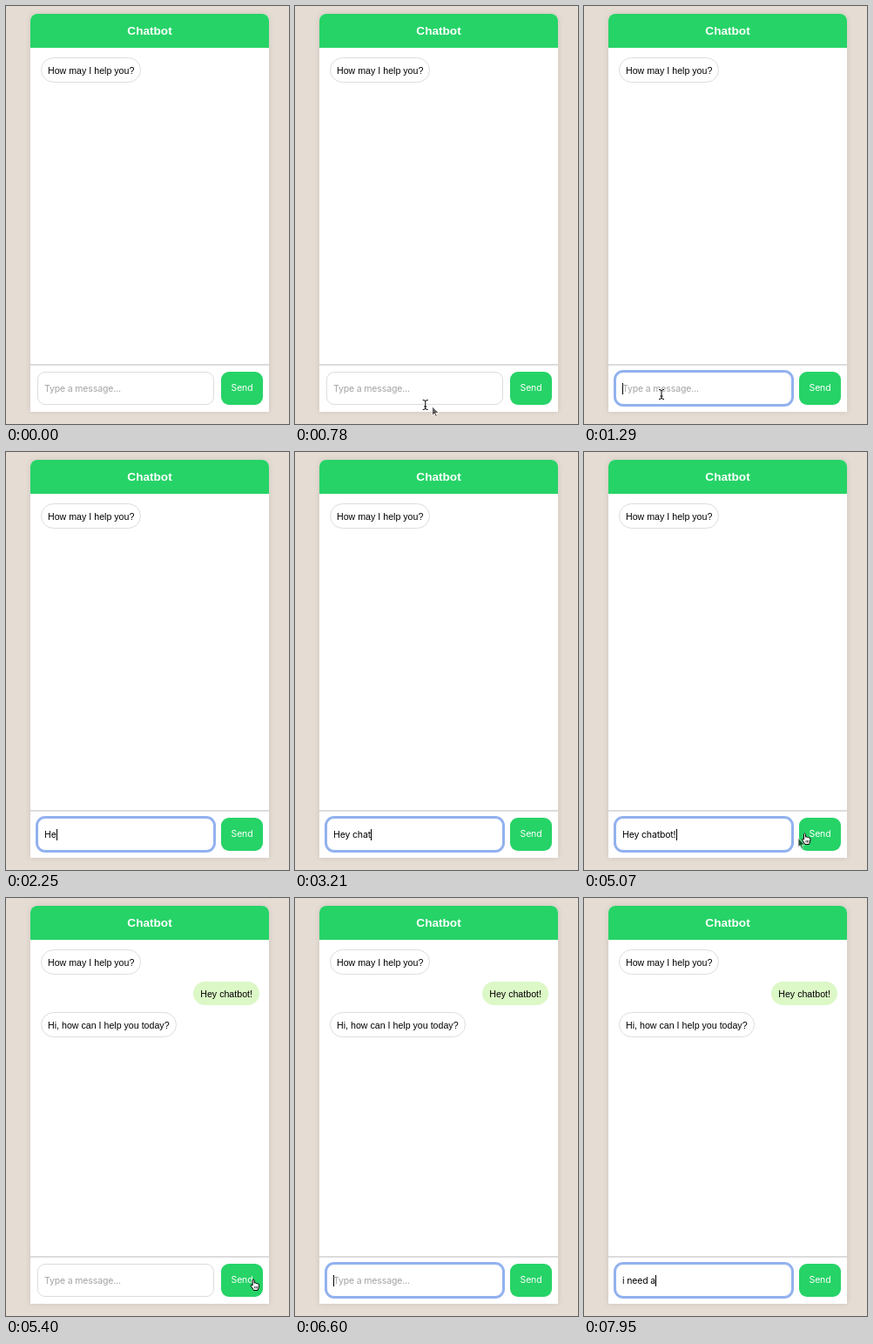
An HTML page for the animation above (8 s loop, 325 by 480 pixels).

```html
<!DOCTYPE html>
<html lang="en">
<head>
<meta charset="utf-8">
<title>Chatbot</title>
<style>
html, body { margin: 0; width: 100%; height: 100%; overflow: hidden; }
body { position: relative; background: #e5dcd3; font: 10.65px/14px "Liberation Sans", Arial, sans-serif; color: #000; }
body * { box-sizing: border-box; }
.card, .card > div, .cursor { position: absolute; }
.card { left: 28px; top: 9px; width: 274px; height: 457px; background: #fff; border-radius: 8px 8px 0 0; box-shadow: 0 0 7px rgba(0, 0, 0, .1); }
.card > .header { left: 0; top: 0; width: 274px; height: 39px; border-radius: 8px 8px 0 0; background: #26d367; color: #fff; font-weight: bold; font-size: 13.6px; line-height: 39px; text-align: center; }
.card > .bubble { height: 29px; padding: 7px 8px; border: 1px solid #ddd; border-radius: 15px; line-height: 14px; white-space: nowrap; left: 12px; padding: 7px; }
.card > .user { left: auto; right: 11px; top: 87px; height: 27px; padding: 7px 8px; border: 0; background: #dcf8c6; }
.card > .rule { left: 0; top: 402px; width: 274px; height: 2px; background: #dcdcdc; }
.card > .field, .card > .send { top: 411px; height: 38px; font: 10.5px/38px Inter, sans-serif; letter-spacing: -.15px; white-space: pre; }
.card > .field { left: 8px; width: 203px; padding-left: 7px; border: 1px solid #ddd; border-radius: 9px; background: #fff; }
.card > .field.focus { border-color: #91b1ef; box-shadow: 0 0 0 2px #91b1ef; }
.card > .send { left: 219px; width: 48px; border-radius: 9px; background: #26d367; color: #fff; text-align: center; }
.hint { color: #a3a3a3; }
.caret { display: inline-block; width: 1px; height: 13px; margin-right: -1px; background: #000; vertical-align: -3px; }
.cursor { left: 0; top: 0; width: 16px; height: 16px; overflow: visible; fill: #fff; stroke: #000; stroke-linejoin: round; }
[hidden] { display: none !important; }
</style>
</head>
<body>
<div class="card">
  <div class="header">Chatbot</div>
  <div class="bubble" style="top:50px">How may I help you?</div>
  <div class="bubble user reply">Hey chatbot!</div>
  <div class="bubble reply" style="top:122px">Hi, how can I help you today?</div>
  <div class="rule"></div>
  <div class="field"><span class="typed"></span><i class="caret"></i><span class="hint">Type a message...</span></div>
  <div class="send">Send</div>
</div>
<script>
const LOOP = 8000, STEP = 30;
const SENT = 5250;
const FOCUS = [[1020, 5220], [6240, LOOP]];
const VISIBLE = [[480, 1650], [4170, 6600]];
// Key press times for each message
const MESSAGES = [
  { text: 'Hey chatbot!', keys: [1650, 2130, 2340, 2550, 2730, 2880, 3060, 3210, 3600, 3750, 3840, 3990], end: SENT },
  { text: 'i need a', keys: [6630, 6780, 6930, 7080, 7260, 7440, 7620, 7950], end: LOOP }
];
// Pointer path: time, x, y
const PATH = [[480, 245, 484], [700, 170, 462], [1020, 89, 446], [4170, 89, 446], [4380, 94, 447],
  [4680, 94, 447], [4710, 105, 446], [5050, 250, 443], [5190, 285, 443], [5520, 286, 443],
  [5700, 255, 442], [6150, 110, 446], [LOOP, 110, 446]];
const SHAPES = {
  beam: '<path fill="none" stroke="#fff" stroke-width="2.4" d="M-3-5.5Q0-5.5 0-4V4Q0 5.5-3 5.5M3-5.5Q0-5.5 0-4M0 4Q0 5.5 3 5.5M-1.5 2H1.5"/><path fill="none" d="M-3-5.5Q0-5.5 0-4V4Q0 5.5-3 5.5M3-5.5Q0-5.5 0-4M0 4Q0 5.5 3 5.5M-1.5 2H1.5"/>',
  hand: '<path d="M-2.5 2V-4.2Q-1.5-6 -.5-4.2V-.8Q.8-1.7 1.5-.5Q2.7-1 3.2 0Q5-.3 5 1.5Q5 4.5 3.5 7.5H-1.2Q-2.5 5-4.5 2.5Q-5 .5-2.5 2Z"/><path stroke-width=".7" d="M0 3V5.5M1.5 3V5.5M3 3V5.5"/>',
  arrow: '<path fill="#000" stroke="#fff" d="M0 0V11L2.6 8.7 4.3 12.4 6 11.6 4.4 8H8Z"/>'
};

const find = selector => document.querySelector(selector);
const field = find('.field'), typed = find('.typed'), caret = find('.caret'), hint = find('.hint');
const replies = document.querySelectorAll('.reply');
const within = (t, spans) => spans.some(([from, to]) => t >= from && t < to);

function makeCursor(opacity) {
  const svg = document.createElementNS('http://www.w3.org/2000/svg', 'svg');
  svg.setAttribute('class', 'cursor');
  svg.style.opacity = opacity;
  document.body.append(svg);
  return svg;
}
const trail = makeCursor(.6), cursor = makeCursor(1);

function pointerAt(t) {
  const i = Math.max(1, PATH.findIndex(([time]) => time >= t));
  const [t0, x0, y0] = PATH[i - 1], [t1, x1, y1] = PATH[i];
  const k = Math.max(0, (t - t0) / (t1 - t0));
  return [x0 + (x1 - x0) * k, y0 + (y1 - y0) * k];
}

function shapeAt(x, y) {
  if (y < 420 || y > 458) return 'arrow';
  if (x >= 36 && x <= 239) return 'beam';
  return x >= 247 && x <= 295 ? 'hand' : 'arrow';
}

function drawCursor(svg, [x, y], shown) {
  svg.style.display = shown ? '' : 'none';
  svg.style.transform = `translate(${x}px, ${y}px)`;
  const shape = shapeAt(x, y);
  if (svg.dataset.shape !== shape) {
    svg.dataset.shape = shape;
    svg.innerHTML = SHAPES[shape];
  }
}

function render(t) {
  const message = MESSAGES.find(m => t < m.end);
  const text = message.text.slice(0, message.keys.filter(time => time <= t).length);
  const focused = within(t, FOCUS);
  typed.textContent = text;
  hint.hidden = text !== '';
  caret.hidden = !focused;
  field.classList.toggle('focus', focused);
  replies.forEach(bubble => bubble.hidden = t < SENT);

  const tick = Math.floor(t / STEP) * STEP;
  const now = pointerAt(tick), before = pointerAt(tick - STEP);
  const shown = within(t, VISIBLE);
  const moved = Math.hypot(now[0] - before[0], now[1] - before[1]) > 1;
  drawCursor(cursor, now, shown);
  drawCursor(trail, before, shown && moved);
}

function frame() {
  render(performance.now() % LOOP);
  requestAnimationFrame(frame);
}
frame();
</script>
</body>
</html>
```
